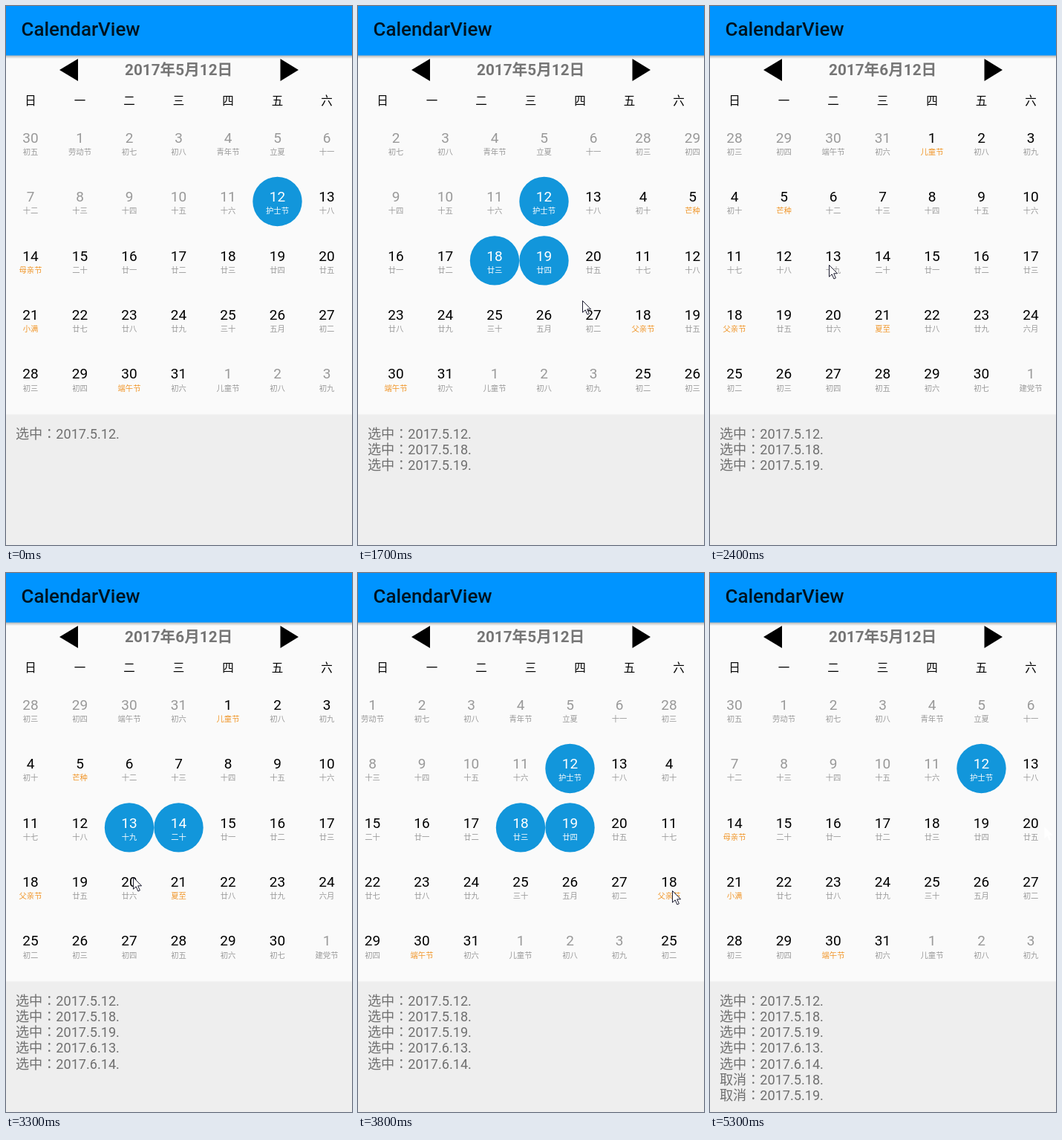
An HTML page for the animation above (6000 ms loop, 466x725 px).

```html
<!DOCTYPE html>
<html lang="zh-CN">
<head>
<meta charset="utf-8">
<title>CalendarView</title>
<style>
  html, body { margin: 0; width: 100%; height: 100%; overflow: hidden; background: #fafafa; }
  svg { display: block; font-family: Roboto, "Noto Sans CJK SC", "Noto Sans CJK", sans-serif; }
  .mid { text-anchor: middle; }
  .bar { font-size: 25.9px; font-weight: 500; fill: rgba(0, 0, 0, .87); }
  .month { font-size: 20.7px; font-weight: 700; fill: #757575; }
  .week { font-size: 15.5px; }
  .log { font-size: 18.12px; fill: #707070; }
  .colon { font-family: "Noto Sans CJK JP", "Noto Sans CJK", sans-serif; }
  .day { font-size: 19px; }
  .lunar { font-size: 10.35px; fill: #999; }
  .feast .lunar { fill: #f0962a; }
  .off .day, .off .lunar { fill: #999; }
  .on .day, .on .lunar { fill: #fff; }
  .cell circle { fill: #1296db; visibility: hidden; }
  .cell.on circle { visibility: visible; }
</style>
</head>
<body>
<svg id="stage" width="466" height="725" viewBox="0 0 466 725">
  <defs>
    <linearGradient id="shade" x2="0" y2="1">
      <stop offset="0" stop-color="#000" stop-opacity=".3"/>
      <stop offset="1" stop-color="#000" stop-opacity="0"/>
    </linearGradient>
  </defs>
  <rect width="466" height="725" fill="#fafafa"/>
  <g id="pages"></g>
  <rect y="549.5" width="466" height="176" fill="#eee"/>
  <rect y="66" width="466" height="5" fill="url(#shade)"/>
  <rect width="466" height="66.5" fill="#0094ff"/>
  <text class="bar" x="20.5" y="39.5">CalendarView</text>
  <path d="M72 86L97 71V101ZM394 86L369.5 71V101Z"/>
  <text id="month" class="month mid" x="232.7" y="93"></text>
  <g id="week"></g>
  <g id="logs"></g>
  <path id="cursor" d="M.5.5V16.2L4.2 12.8 6.9 19 9.4 17.9 6.7 11.8H11.6Z" fill="#fff" stroke-linejoin="round"/>
</svg>
<script>
const LOOP = 6000, STEP = 100, WIDTH = 466;
const $ = id => document.getElementById(id);

function add(parent, tag, attrs, text) {
  const el = document.createElementNS('http://www.w3.org/2000/svg', tag);
  for (const key in attrs) el.setAttribute(key, attrs[key]);
  if (text !== undefined) el.textContent = text;
  parent.append(el);
  return el;
}

const colX = i => 33 + 66.5 * i;
const NUM = '十一二三四五六七八九';

function lunarName(n, monthName) {
  if (n === 1) return monthName;
  if (n === 20) return '二十';
  if (n === 30) return '三十';
  return (n <= 10 ? '初' : n < 20 ? '十' : '廿') + NUM[n % 10];
}

// before: length of the previous month, lead: its days shown first
const months = {
  5: { before: 30, lead: 1, days: 31, from: 12, lunar: 5, moon: 30, next: '五月',
       feasts: { 1: '劳动节', 4: '青年节', 5: '立夏', 12: '护士节', 14: '母亲节', 21: '小满', 30: '端午节', 32: '儿童节' } },
  6: { before: 31, lead: 4, days: 30, from: 1, lunar: 3, moon: 29, next: '六月',
       feasts: { 2: '端午节', 4: '儿童节', 8: '芒种', 21: '父亲节', 24: '夏至', 34: '建党节' } }
};

function buildPage(m) {
  const page = add($('pages'), 'g', {});
  const cells = {};
  for (let i = 0; i < 35; i++) {
    const n = i - m.lead + 1;
    const inside = n >= 1 && n <= m.days;
    const label = n < 1 ? m.before + n : n > m.days ? n - m.days : n;
    const active = inside && n >= m.from;
    const kind = !active ? ' off' : m.feasts[i] ? ' feast' : '';
    const x = colX(i % 7), y = 79.45 * Math.floor(i / 7);
    const cell = add(page, 'g', { class: 'cell' + kind, transform: `translate(${x} ${y})` });
    add(cell, 'circle', { cx: 0, cy: 183.5, r: 33.2 });
    add(cell, 'text', { class: 'day mid', y: 183.7 }, label);
    const moonDay = (m.lunar + i - 1) % m.moon + 1;
    add(cell, 'text', { class: 'lunar mid', y: 200 }, m.feasts[i] || lunarName(moonDay, m.next));
    if (inside) cells[n] = cell;
  }
  return { page, cells };
}

const pages = { 5: buildPage(months[5]), 6: buildPage(months[6]) };
[...'日一二三四五六'].forEach((d, i) => add($('week'), 'text', { class: 'week mid', x: colX(i), y: 133 }, d));

// time, month, day: each tap toggles a date
const taps = [[0, 5, 12], [700, 5, 18], [1100, 5, 19], [2600, 6, 13], [3100, 6, 14], [4500, 5, 18], [5000, 5, 19]];
const seen = new Set();
const lines = taps.map(([, month, day], i) => {
  const key = month + '.' + day;
  const line = add($('logs'), 'text', { class: 'log', x: 13, y: 581.7 + 21.2 * i });
  add(line, 'tspan', {}, seen.has(key) ? '取消' : '选中');
  add(line, 'tspan', { class: 'colon', lang: 'ja' }, '：');
  add(line, 'tspan', {}, `2017.${key}.`);
  seen.add(key);
  return line;
});

// time, page offset
const scroll = [
  [0, 0], [1600, 22], [1700, 115], [1800, 255], [1900, 372.5], [2000, 433], [2100, 457], [2200, 464], [2300, 466],
  [3500, 436], [3600, 346], [3700, 220], [3800, 80], [3900, 23], [4000, 4], [4100, 0]
];
const titles = [[0, 5], [1900, 6], [3800, 5]];

// time, x, y of the pointer tip
const pointer = [
  [0, -50, 0], [200, 416, 311], [300, 372, 332], [400, 328, 350], [500, 308, 353],
  [800, 342, 354], [900, 366, 354], [1100, 370, 354], [1200, 388, 370], [1300, 412, 388], [1400, 423, 397],
  [1600, 395, 397], [1700, 302, 396], [1800, 165, 393], [1900, 76, 391], [2100, 92, 376], [2200, 120, 362],
  [2300, 142, 353], [2400, 160, 348], [2700, 190, 349], [2800, 224, 350], [2900, 242, 350],
  [3200, 212, 380], [3300, 171, 409], [3500, 205, 411], [3600, 300, 417], [3700, 408, 425], [3800, 423, 427],
  [3900, 398, 412], [4000, 342, 388], [4100, 299, 370], [4200, 310, 346], [4500, 320, 344],
  [4600, 345, 347], [4700, 363, 349], [5000, 368, 349], [5100, 394, 346], [5200, 428, 343], [5300, 450, 341]
];

const at = (table, t) => table.findLast(row => row[0] <= t);

function render(t) {
  const shift = at(scroll, t)[1];
  pages[5].page.setAttribute('transform', `translate(${-shift} 0)`);
  pages[6].page.setAttribute('transform', `translate(${WIDTH - shift} 0)`);
  $('month').textContent = `2017年${at(titles, t)[1]}月12日`;

  const chosen = new Set();
  taps.forEach(([time, month, day], i) => {
    const cell = pages[month].cells[day];
    if (time <= t && !chosen.delete(cell)) chosen.add(cell);
    lines[i].setAttribute('visibility', time <= t ? 'visible' : 'hidden');
  });
  for (const [, month, day] of taps) {
    const cell = pages[month].cells[day];
    cell.classList.toggle('on', chosen.has(cell));
  }

  const [, x, y] = at(pointer, t);
  $('cursor').setAttribute('transform', `translate(${x} ${y})`);
  $('cursor').setAttribute('stroke', t >= 5300 ? 'none' : '#1c1c30');
}

const start = performance.now();
let shown = -1;
function tick() {
  const t = Math.floor((performance.now() - start) % LOOP / STEP) * STEP;
  if (t !== shown) render(shown = t);
  requestAnimationFrame(tick);
}
tick();
</script>
</body>
</html>
```
